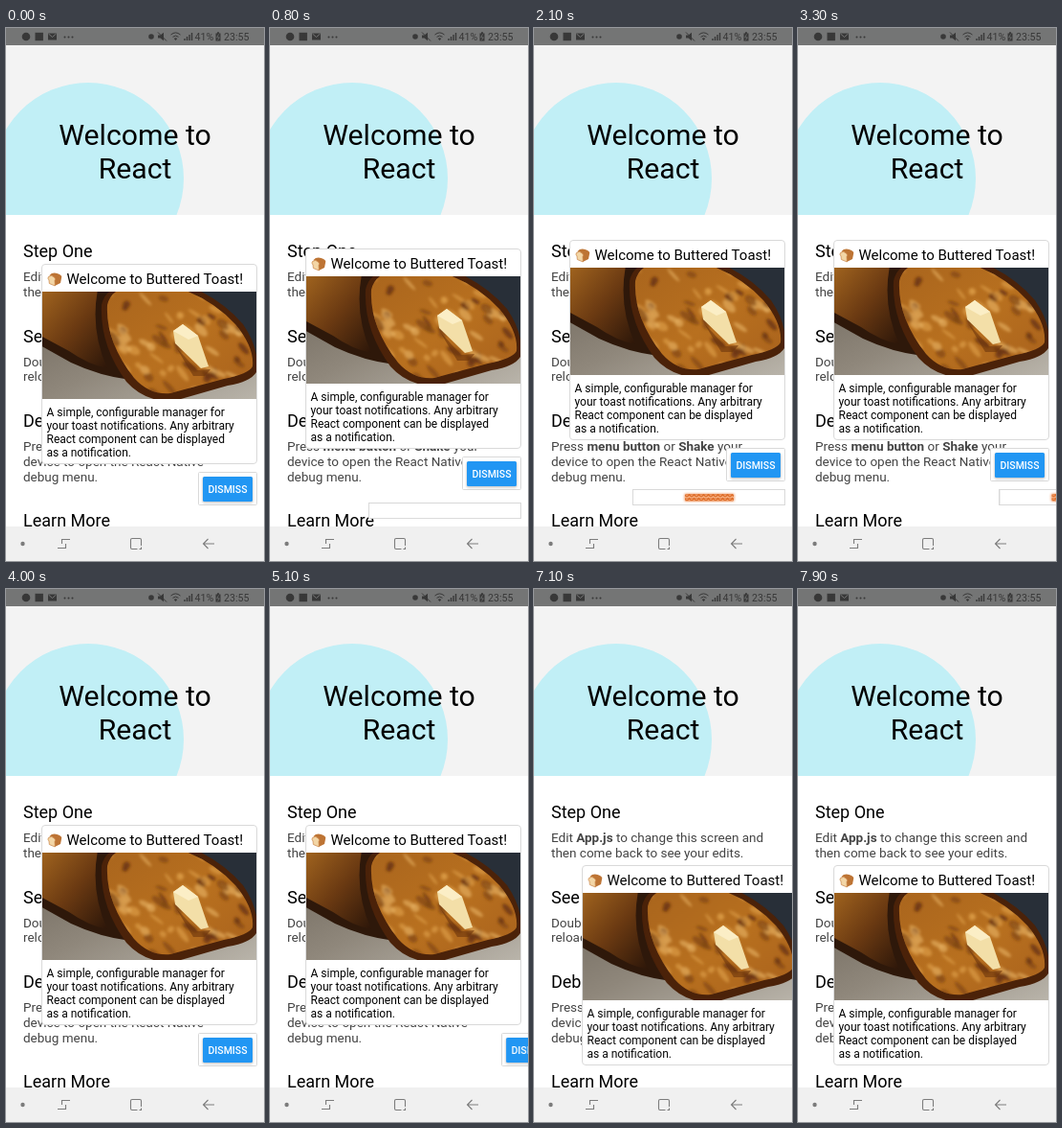
Write an HTML page that moves like this. It is 270 by 556 pixels and loops after 8000 ms.

```html
<!DOCTYPE html>
<html lang="en">
<head>
<meta charset="utf-8">
<title>Toast notifications</title>
<style>
  html, body { margin: 0; width: 100%; height: 100%; overflow: hidden; background: #fff; }
  svg { display: block; font-family: Roboto, "Liberation Sans", sans-serif; }
  .hero { font-size: 30.2px; text-anchor: middle; }
  .head { font-size: 18px; }
  .body { font-size: 13.5px; fill: #444; }
  .body tspan { font-weight: 700; }
  .box { fill: #fff; stroke: #d9d9d9; }
  .status { fill: #383838; font-size: 10.6px; }
  .line { fill: none; stroke: #383838; }
  .nav { fill: none; stroke: #7c7c7c; stroke-width: 1.1; }

  .card, .dismiss, .banner, .strip { animation: 8s linear infinite; }
  .card { animation-name: card; }
  .dismiss { animation-name: dismiss; }
  .banner { animation-name: banner; }
  .strip { animation-name: strip; }

  /* Stack rises, drops twice as toasts leave, then the card is tugged sideways. */
  @keyframes card {
    0% { transform: translate(0, 0); }
    4.69% { transform: translate(0, 0); animation-timing-function: cubic-bezier(.5, 1, .89, 1); }
    17.94% { transform: translate(0, -25px); }
    43.75% { transform: translate(0, -25px); animation-timing-function: cubic-bezier(.5, 1, .89, 1); }
    49.5% { transform: translate(0, 0); }
    67.5% { transform: translate(0, 0); animation-timing-function: cubic-bezier(.5, 1, .89, 1); }
    73.1% { transform: translate(0, 42px); }
    75% { transform: translate(0, 42px); animation-timing-function: ease-in-out; }
    78.75% { transform: translate(-5px, 42px); }
    80.6% { transform: translate(-6px, 42px); animation-timing-function: ease-in; }
    85% { transform: translate(8px, 42px); animation-timing-function: ease-out; }
    88.75% { transform: translate(13px, 42px); }
    90% { transform: translate(14px, 42px); animation-timing-function: ease-in-out; }
    93.1% { transform: translate(-3px, 42px); animation-timing-function: ease-in-out; }
    96.25%, 100% { transform: translate(0, 42px); }
  }
  @keyframes dismiss {
    0% { transform: translate(0, 0); }
    4.69% { transform: translate(0, 0); animation-timing-function: cubic-bezier(.5, 1, .89, 1); }
    17.94% { transform: translate(0, -25px); }
    43.75% { transform: translate(0, -25px); animation-timing-function: cubic-bezier(.5, 1, .89, 1); }
    49.5% { transform: translate(0, 0); }
    58.75% { transform: translate(0, 0); animation-timing-function: ease-in; }
    66.25%, 100% { transform: translate(80px, 0); }
  }
  @keyframes banner {
    0% { transform: translate(0, 39px); }
    4.69% { transform: translate(0, 39px); animation-timing-function: cubic-bezier(.5, 1, .89, 1); }
    17.94% { transform: translate(0, 0); }
    36.25% { transform: translate(0, 0); animation-timing-function: ease-in; }
    43.1%, 100% { transform: translate(180px, 0); }
  }
  @keyframes strip {
    0%, 23.74% { opacity: 0; }
    23.75%, 100% { opacity: 1; }
  }
</style>
</head>
<body>
<svg width="270" height="556" viewBox="0 0 270 556">
  <defs>
    <clipPath id="header"><path d="M0 18H270V195H0Z"/></clipPath>
    <clipPath id="photo"><path d="M0 0H224V112H0Z"/></clipPath>
    <clipPath id="slice"><path d="M68 14Q72 -4 96 -6L142 -4Q178 8 202 34Q222 58 220 78Q216 86 190 91L134 106Q112 108 96 90Q66 52 68 14Z"/></clipPath>
    <linearGradient id="plate" x1="0" y1="0" x2="1" y2="1">
      <stop offset="0" stop-color="#6f675c"/>
      <stop offset=".5" stop-color="#8f877b"/>
      <stop offset="1" stop-color="#b9b4aa"/>
    </linearGradient>
    <linearGradient id="back" x1="0" y1="0" x2="1" y2="1">
      <stop offset="0" stop-color="#a2651f"/>
      <stop offset=".5" stop-color="#6b3a12"/>
      <stop offset="1" stop-color="#2c1609"/>
    </linearGradient>
    <linearGradient id="bread" x1="0" y1="0" x2="1" y2="1">
      <stop offset="0" stop-color="#a8641d"/>
      <stop offset=".5" stop-color="#b8701f"/>
      <stop offset="1" stop-color="#a65f1c"/>
    </linearGradient>
    <filter id="soft"><feGaussianBlur stdDeviation="1.6"/></filter>
    <filter id="glow" x="-20%" y="-60%" width="140%" height="220%"><feGaussianBlur stdDeviation="1"/></filter>
    <pattern id="weave" width="5" height="4" patternUnits="userSpaceOnUse">
      <path d="M0 4L2.5 0L5 4M0 1.5H5" fill="none" stroke="#f9b98e" stroke-width=".7"/>
    </pattern>
  </defs>

  <rect width="270" height="556" fill="#fff"/>
  <g clip-path="url(#header)">
    <rect y="18" width="270" height="177" fill="#f3f3f3"/>
    <circle cx="86" cy="157" r="100" fill="#c1eff6"/>
  </g>
  <text class="hero" x="135" y="122">Welcome to</text>
  <text class="hero" x="135" y="157">React</text>

  <g class="head">
    <text x="18" y="239">Step One</text>
    <text x="18" y="328">See Your Changes</text>
    <text x="18" y="416">Debug</text>
    <text x="18" y="520">Learn More</text>
  </g>
  <g class="body">
    <text x="18" y="264">Edit <tspan>App.js</tspan> to change this screen and</text>
    <text x="18" y="280">then come back to see your edits.</text>
    <text x="18" y="353">Double tap <tspan>R</tspan> on your keyboard to</text>
    <text x="18" y="368">reload your app's code.</text>
    <text x="18" y="441">Press <tspan>menu button</tspan> or <tspan>Shake</tspan> your</text>
    <text x="18" y="457">device to open the React Native</text>
    <text x="18" y="473">debug menu.</text>
  </g>

  <g class="banner">
    <rect class="box" x="103.5" y="481.5" width="159" height="16"/>
    <g class="strip">
      <rect x="157" y="485.5" width="53" height="8.500" rx="2" fill="#f3b48e" filter="url(#glow)"/>
      <rect x="158" y="486" width="51" height="7.5" rx="1.5" fill="#de6f2c"/>
      <rect x="158" y="486" width="51" height="7.5" rx="1.5" fill="url(#weave)"/>
    </g>
  </g>

  <g class="dismiss">
    <rect class="box" x="201.5" y="463.5" width="61" height="34" rx="1"/>
    <rect x="205.5" y="469" width="53" height="26.5" rx="2" fill="#777" opacity=".4" filter="url(#glow)"/>
    <rect x="206" y="468" width="52" height="26" rx="1.5" fill="#2196f3"/>
    <text x="232" y="485" font-size="10.5" font-weight="500" fill="#fff" text-anchor="middle">DISMISS</text>
  </g>

  <g class="card">
    <rect class="box" x="37.5" y="246.5" width="225" height="208" rx="3.5"/>
    <g transform="translate(43.500 255)">
      <path d="M2 3Q5 -.5 10 1Q16 3 14.500 6L13.500 11L7.500 14L4 6Z" fill="#bd7434"/>
      <path d="M1 4.500Q4 2 7 5Q9 7 7.500 8.500L7.800 14L1.800 11.500L1.500 8Q-.5 6 1 4.500Z" fill="#f3d6a6" stroke="#c98345" stroke-width=".7"/>
    </g>
    <text x="63.5" y="267" font-size="15">Welcome to Buttered Toast!</text>
    <g transform="translate(38 275)" clip-path="url(#photo)">
      <rect width="224" height="112" fill="url(#plate)"/>
      <path d="M130 -2H226V74L180 40Z" fill="#282f38"/>
      <path d="M-2 -2H76L92 92Q60 88 30 74L-2 56Z" fill="#2e180a"/>
      <path d="M-2 -2H58Q50 40 68 80Q48 76 28 62L-2 46Z" fill="url(#back)"/>
      <path d="M62 14Q66 -6 94 -8L148 -8Q186 6 210 34Q228 60 224 84Q218 94 194 98L138 114Q108 116 88 94Q60 56 62 14Z" fill="#4b2209"/>
      <g clip-path="url(#slice)">
        <rect x="60" y="-8" width="170" height="130" fill="url(#bread)"/>
        <g id="grill" filter="url(#soft)"></g>
      </g>
      <path d="M140 58L162 82L176 81L170 88L158 88Z" fill="#6d360d" opacity=".6"/>
      <path d="M137 41L147 34L163 46L174 78L166 80L139 54Z" fill="#f3dfa8"/>
      <path d="M137 41L147 34L163 46L153 50Z" fill="#fbeec6"/>
    </g>
    <g font-size="12">
      <text x="42.5" y="405">A simple, configurable manager for</text>
      <text x="42.5" y="419">your toast notifications. Any arbitrary</text>
      <text x="42.5" y="433">React component can be displayed</text>
      <text x="42.5" y="447">as a notification.</text>
    </g>
  </g>

  <!-- Status bar -->
  <rect width="270" height="18" fill="#747575"/>
  <g class="status">
    <circle cx="21" cy="9" r="4.300"/>
    <rect x="30.500" y="4.800" width="8.400" height="8.400"/>
    <path d="M44 5.500H53V12.500H44Z"/>
    <path d="M44.500 6L48.500 9.500L52.500 6" fill="none" stroke="#747575"/>
    <circle cx="61.500" cy="9.500" r="1"/><circle cx="65.500" cy="9.500" r="1"/><circle cx="69.500" cy="9.500" r="1"/>
    <circle cx="152" cy="9" r="2.800"/>
    <path d="M159 7.500H161.500L165 4.800V13.200L161.500 10.500H159Z"/>
    <path class="line" d="M159 4.500L168 13.500"/>
    <path class="line" d="M172.500 7Q177.500 2.800 182.500 7M174.500 9.300Q177.500 6.800 180.500 9.300"/>
    <path d="M175.800 11L177.500 13L179.200 11Q177.500 9.700 175.800 11Z"/>
    <path class="line" d="M187 13V11M189.500 13V9M192 13V7M194.500 13V5" stroke-width="1.400"/>
    <text x="197.500" y="13">41%</text>
    <path d="M219.500 5.500H221V4.300H223V5.500H224.500V13.500H219.500Z"/>
    <path d="M222.500 6.500L220.700 9.800H223.300L221.500 12.600" fill="none" stroke="#747575" stroke-width=".8"/>
    <text x="228" y="13">23:55</text>
  </g>

  <!-- Navigation bar -->
  <rect y="520" width="270" height="36" fill="#f0f0f0"/>
  <circle cx="17.500" cy="538" r="2.200" fill="#7c7c7c"/>
  <g class="nav">
    <path d="M58.500 538V533.500H67M54 542.500H62.500V538"/>
    <path d="M137.500 543.500H132Q130.500 543.500 130.500 542V534Q130.500 532.500 132 532.500H140Q141.500 532.500 141.500 534V540M141.500 541.500V543.500H139.500"/>
    <path d="M218 538H206.500M211.500 533L206.500 538L211.500 543"/>
  </g>
</svg>
<script>
  // Scatter soft charred and golden patches over the slice.
  let seed = 11;
  const rand = () => (seed = seed * 16807 % 2147483647) / 2147483647;
  const tones = ["#57270a", "#7d430f", "#dfa04a", "#e6b062"];
  const grill = document.getElementById("grill");
  for (let i = 0; i < 80; i++) {
    const patch = document.createElementNS("http://www.w3.org/2000/svg", "ellipse");
    const x = 68 + rand() * 150, y = rand() * 108;
    const attrs = { cx: x, cy: y, rx: 3 + rand() * 7, ry: 1.5 + rand() * 3,
                    fill: tones[i % tones.length], opacity: .65,
                    transform: `rotate(${15 + rand() * 40} ${x} ${y})` };
    for (const key in attrs) patch.setAttribute(key, attrs[key]);
    grill.append(patch);
  }
</script>
</body>
</html>
```
